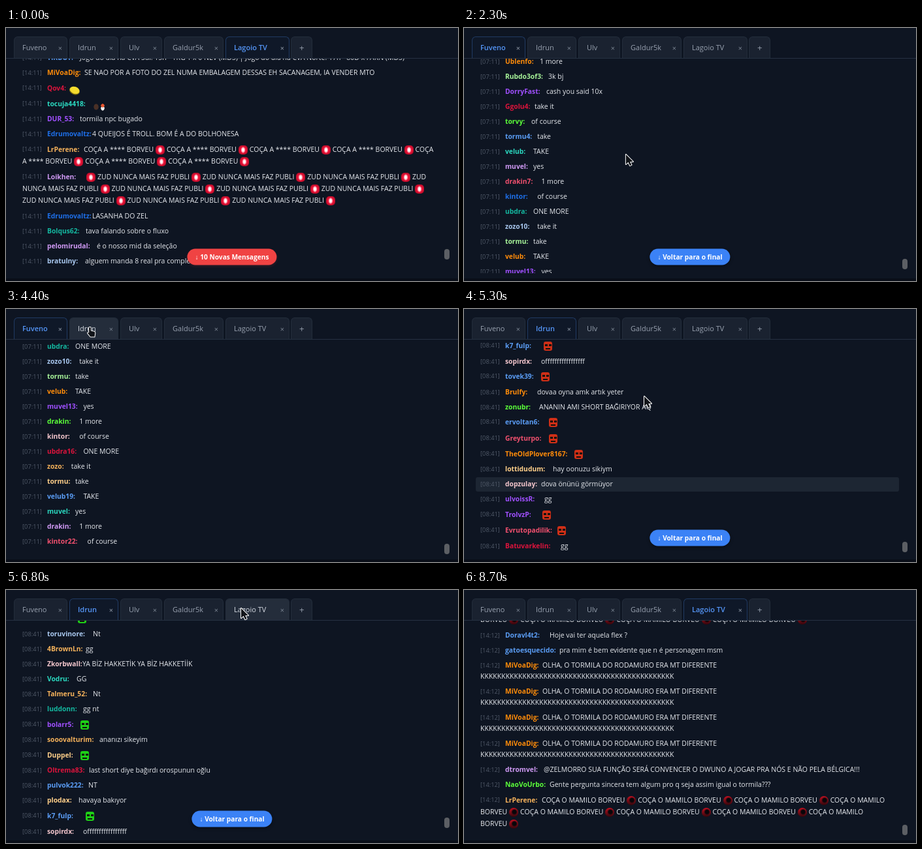
These frames come from a looping animation (692 by 388 pixels, 8800 ms). An HTML page:

```html
<!DOCTYPE html>
<html lang="pt-BR">
<head>
<meta charset="utf-8">
<title>Chat em abas</title>
<style>
html, body { margin: 0; width: 100%; height: 100%; overflow: hidden; background: #0e1522; }
body { font: 10.5px "Open Sans", "Noto Sans", sans-serif; color: #e6e9ee; }
#stage { position: relative; width: 692px; height: 388px; overflow: hidden; }
#stage::before { content: ""; position: absolute; left: 0; right: 0; top: 384px; height: 4px; background: #090e18; }
#stage > *, .row, .row > i, .row > b { position: absolute; }
.tab { top: 13px; height: 33px; box-sizing: border-box; padding-left: 12px; border: 1px solid #232d3b; border-bottom: 0;
  border-radius: 6px 6px 0 0; background: #1a2230; color: #98a1af; font-size: 11px; font-weight: 500; line-height: 32px; white-space: pre; }
.tab span { position: absolute; right: 7px; top: 1px; color: #7b8492; }
.tab.hover { background: #242d3b; color: #d5dae2; }
.tab.active { background: #0f1828; border-color: #203a62; color: #5596f8; font-weight: 600; }
#line { top: 46px; left: 0; width: 692px; height: 1px; background: #263142; }
#chat { top: 47px; left: 0; width: 692px; height: 329px; overflow: hidden; }
.list { position: absolute; top: -47px; left: 0; width: 100%; }
.row { left: 18px; width: 641px; padding-left: 7px; border-radius: 3px; line-height: 17px; white-space: pre; }
.row.emoted { line-height: 18px; }
.row.hover { background: #1d2633; box-shadow: 0 -2px #1d2633, 0 3px #1d2633; }
.row i { left: 7px; text-indent: 0; font-style: normal; font-size: 9.3px; color: #505968; }
.row b { left: 45px; text-indent: 0; font-size: 10.3px; }
.e { display: inline-block; width: 14px; height: 14px; margin: 0 .2px; vertical-align: middle; border-radius: 4px; text-indent: 0; }
.siren { border-radius: 5px; filter: brightness(var(--glow));
  background: radial-gradient(3.5px 5px at 50% 50%, #fff 30%, #ffa5b5 70%, #0000), radial-gradient(#f0183c 40%, #8c0018); }
.dark { border-radius: 7px; background: radial-gradient(5px 5px at 58% 45%, #08060a 55%, #0000), linear-gradient(var(--turn), #c01020, #32060c); }
.face { width: 13px; border-radius: 3px; color: #10120f; background:
  linear-gradient(currentColor 0 0) 2px 4px / 4px 3px no-repeat,
  linear-gradient(currentColor 0 0) 8px 4px / 4px 3px no-repeat,
  linear-gradient(currentColor 0 0) 3px 10px / 7px 2px no-repeat, hsl(var(--hue) 80% 45%); }
.blob { width: 16px; height: 12px; margin-top: 6px; border-radius: 50%; background: #f5dc2e; box-shadow: inset 0 -1px 1px #4a3d00;
  transform: rotate(var(--rock)); }
.duo { width: 19px; margin-top: 7px; border-radius: 0; background:
  radial-gradient(4px 5px at 5px 7px, #4a3026 80%, #0000),
  radial-gradient(3px 3px at 15px 5px, #e8552f 80%, #0000),
  radial-gradient(3px 4px at 15px 9px, #eee 80%, #0000); }
#thumb { left: 671px; width: 8px; height: 16px; border-radius: 4px; background: #5c5f64; }
#button { left: 346px; top: 351px; height: 25px; padding: 0 12px; border-radius: 13px; color: #fff;
  font: 700 10.2px/25px "Open Sans", "Noto Sans", sans-serif; white-space: pre; }
#cursor { left: 0; top: 0; overflow: visible; width: 1px; height: 1px; }
</style>
</head>
<body>
<div id="stage">
  <div id="chat"></div>
  <div id="line"></div>
  <div id="thumb"></div>
  <div id="button"></div>
  <svg id="cursor" fill="#12151a" stroke="#fff" stroke-width="2" paint-order="stroke" stroke-linejoin="round">
    <path id="arrow" d="M0 0V15L3.6 11.8 6.2 17.2 8.6 16 6.2 11H11Z"/>
    <path id="hand" d="M4.5 1A1.4 1.4 0 0 1 5.9 2.4V6.6L11 7.8Q12.5 8.2 12.3 9.8L11.5 15.5H5.3L1.2 10.3Q.9 8.8 2.3 8.9L3.1 9.5V2.4A1.4 1.4 0 0 1 4.5 1Z"/>
  </svg>
</div>
<script>
const LOOP = 8800, ROW = 23;
const $ = id => document.getElementById(id);

const COLORS = { b: '#5b9df5', B: '#1e6fe8', o: '#ff8c0a', c: '#dc143c', t: '#2bd9c0', g: '#14b8a0', v: '#a050ff', y: '#f5b25b',
  l: '#d09af5', s: '#a9c8ef', G: '#5cff3a', n: '#ffd08a', p: '#f0506e', h: '#a8f59a', w: '#f3c6cc' };
const EMOTES = { '#': 'siren', '%': 'dark', '~': 'face', '^': 'blob', '§': 'duo' };

const coca = 'COÇA A **** BORVEU # ', zud = 'ZUD NUNCA MAIS FAZ PUBLI # ', mamilo = 'COÇA O MAMILO BORVEU % ';
const laugh = 'OLHA, O TORMILA DO RODAMURO ERA MT DIFERENTE/' + 'K'.repeat(46);
const mamiloLines = mamilo.repeat(3) + 'COÇA O MAMILO/BORVEU % ' + mamilo.repeat(3);

// Each line: colour|name|message x|message; "/" breaks a line
const parse = text => text.trim().split('\n').map(line => line.split('|'));

const filler = (count, messages) => {
  const parts = ['tor', 'vel', 'mu', 'dra', 'kin', 'ub', 'zo'], hues = Object.keys(COLORS);
  return Array.from({ length: count }, (_, i) => {
    const name = parts[i % 7] + parts[(i * 3 + 2) % 7] + (i % 3 ? '' : i + 4);
    return [hues[i * 4 % 15], name, 75 + name.length * 6.2, messages[i * 5 % messages.length]];
  });
};

const takeRows = parse(`
G|FuvenoRunsBig|165|take
o|Dovek_EK|124|ONE MORE
l|Selvinudora|140|Take that
n|SlowGrotoFan|151|take it
c|Urapa|105|TAKE
s|plvozu|109|yes
p|Onlytov264|135|ONE MORE
G|TurveyTwo|134|1 more
s|dovaltei|118|take
o|Ublenfo|116|1 more
h|Rubdo3of3|129|3k bj
v|DorryFast|126|cash you said 10x
c|Ggolu4|108|take it
G|torvy|103|of course`).concat(filler(19, ['take', '1 more', 'take it', 'yes', 'ONE MORE', 'TAKE', 'of course']));

const turkishRows = parse(`
t|kudrel5|110|~
s|toruvinore|133|Nt
y|4BrownLn|122|gg
w|Zkorbwall|117|YA BİZ HAKKETİK YA BİZ HAKKETİİK
t|Vodru|108|GG
y|Talmeru_52|133|Nt
g|luddonn|118|gg nt
v|bolarr5|114|~
y|sooovalturim|143|ananızı sikeyim
n|Duppel|114|~
c|Oltrema83|127|last short diye bağırdı orospunun oğlu
b|pulvok222|126|NT
n|plodax|111|havaya bakıyor
b|k7_fulp|122|~
w|sopirdx|118|offfffffffffffffff
b|tovek39|118|~
o|Brulfy|112|dovaa oyna amk artık yeter
G|zonubr|115|ANANIN AMI SHORT BAĞIRIYOR AQ
b|ervoltan6|130|~
p|Greyturpo|130|~
o|TheOldPlover8167|169|~
n|lottidudum|136|hay oonuzu sikiym
w|dopzulay|118|dova önünü görmüyor
v|ulvoissR|123|gg
v|TrolvzP|120|~
p|Evrutopadilik|143|~
c|Batuvarkelin|148|gg`).concat(filler(5, ['gg', 'nt', '~', 'GG', 'Nt']));

const brazilRows = parse(`
b|TIKBOT|113|Jogo do dia na CVA Sul: 15h - TRG 1 x 0 NEV (MD3) | Jogo do dia na CVA Norte: 17h - 80D x FARN (MD3)
o|MiVoaDig|120|SE NAO POR A FOTO DO ZEL NUMA EMBALAGEM DESSAS EH SACANAGEM, IA VENDER MTO
c|Qov4|97|^
t|tocuja4418|133|§
v|DUR_53|113|tormila npc bugado
B|Edrumovaltz|132|4 QUEIJOS É TROLL. BOM É A DO BOLHONESA
y|LrPerene|119|${coca.repeat(4)}COÇA/A **** BORVEU # ${coca.repeat(2)}
l|Loikhen|123|# ${zud.repeat(3)}ZUD/NUNCA MAIS FAZ PUBLI # ${zud.repeat(3)}/${zud.repeat(3)}
B|Edrumovaltz|132|LASANHA DO ZEL
g|Bolqus62|122|tava falando sobre o fluxo
l|pelomirudal|139|é o nosso mid da seleção
s|bratulny|121|alguem manda 8 real pra completar
y|LrPerene|119|${mamiloLines}
b|Doravl4t2|131|Hoje vai ter aquela flex ?
b|gatoesquecido|146|pra mim é bem evidente que n é personagem msm
o|MiVoaDig|120|${laugh}
o|MiVoaDig|120|${laugh}
o|MiVoaDig|120|${laugh}
o|MiVoaDig|120|${laugh}
l|dtromvel|122|@ZELMORRO SUA FUNÇÃO SERÁ CONVENCER O DWUNO A JOGAR PRA NÓS E NÃO PELA BÉLGICA!!!
G|NaoVoUrbo|131|Gente pergunta sincera tem algum pro q seja assim igual o tormila???
y|LrPerene|119|${mamiloLines}COÇA O MAMILO/BORVEU %`);

function buildList(rows, firstY, timeOf) {
  const list = document.createElement('div');
  list.className = 'list';
  let y = firstY;
  const items = rows.map(([color, name, x, ...rest], i) => {
    const message = rest.join('|'), emoted = /[#%~^§]/.test(message);
    const lines = message.split('/');
    const row = document.createElement('div');
    row.className = emoted ? 'row emoted' : 'row';
    row.style.top = y - (emoted ? 8.5 : 8) + 'px';
    // Only the first line of a message is indented past the name
    row.innerHTML = `<i>[${timeOf(i)}]</i><b style="color:${COLORS[color]}">${name}:</b>` + lines.map((line, n) =>
      `<div style="text-indent:${n ? 0 : x - 25}px">${line.replace(/[#%~^§]/g, c => `<span class="e ${EMOTES[c]}"></span>`)}</div>`).join('');
    list.append(row);
    const item = { row, y };
    y += ROW + (lines.length - 1) * (emoted ? 18 : 17) + (emoted ? 1.2 : 0);
    item.end = y;
    return item;
  });
  $('chat').append(list);
  return { list, items };
}

const OLD_COUNT = 12;
const takeChat = buildList(takeRows, 57, () => '07:11');
const turkishChat = buildList(turkishRows, 42.8, () => '08:41');
const brazilChat = buildList(brazilRows, 45, i => i < OLD_COUNT ? '14:11' : '14:12');

// Scroll keys are [time, offset]; thumb is thumb travel per scrolled pixel
Object.assign(takeChat, { max: 437, thumb: .0275, keys: [[2000, 437], [2350, 200], [2700, 0], [3300, 0], [3650, 437]] });
Object.assign(turkishChat, { max: 415, thumb: .0275, keys: [[5000, 415], [5300, 290], [5750, 140], [6250, 0]] });
Object.assign(brazilChat, { max: 353, thumb: .06, keys: [[7660, 0], [8150, 353]] });
const chats = [takeChat, turkishChat, null, null, brazilChat];

const tabs = [['Fuveno', 12, 82], ['Idrun', 97, 75], ['Ulv', 175, 64], ['Galdur5k', 242, 91], ['Lagoio TV', 336, 98], ['+', 436, 33]]
  .map(([label, x, width], i) => {
    const el = document.createElement('div');
    el.style.cssText = `left:${x}px;width:${width}px`;
    el.innerHTML = i < 5 ? label + '<span>×</span>' : '<big>+</big>';
    $('stage').insertBefore(el, $('thumb'));
    return { el, x, width };
  });

const pointerKeys = [[150, 400, 300], [900, 60, 29], [1300, 70, 27], [1600, 70, 27], [2000, 240, 190], [2700, 260, 200], [3150, 361, 349],
  [3500, 361, 349], [4200, 130, 10], [4400, 124, 27], [4550, 124, 27], [4950, 276, 134], [6350, 276, 134], [6800, 360, 28],
  [7000, 360, 28], [7450, 324, 352], [8200, 324, 352]];
const handTimes = [[900, 1650], [3080, 3550], [4350, 4620], [6850, 7080], [7380, 8200]];

function track(keys, t) {
  if (t <= keys[0][0]) return keys[0].slice(1);
  const i = keys.findIndex(k => k[0] > t);
  if (i < 0) return keys[keys.length - 1].slice(1);
  const [a, b] = [keys[i - 1], keys[i]], u = (t - a[0]) / (b[0] - a[0]), e = u * u * (3 - 2 * u);
  return a.slice(1).map((v, n) => v + (b[n + 1] - v) * e);
}

function drawButton(t, active, away) {
  const red = active === 4, pulse = (1 - Math.cos(t * Math.PI / 1000)) / 2;
  const visible = red ? t < 7700 : away > 60 && !(active === 0 && t > 3250);
  const button = $('button');
  button.style.display = visible ? '' : 'none';
  button.textContent = red ? `↓ ${t < 1500 ? 10 : 12} Novas Mensagens` : '↓ Voltar para o final';
  button.style.background = red ? '#f04343' : '#3b82f6';
  button.style.boxShadow = red ? `0 2px ${4 + 6 * pulse}px rgba(240,67,67,${.15 + .35 * pulse})` : '0 2px 5px #0006';
  button.style.transform = `translate(-50%,-50%) scale(${red ? 1 + .04 * pulse : 1})`;
}

function draw(t) {
  const active = t < 1500 ? 4 : t < 4430 ? 0 : t < 6950 ? 1 : 4;
  const chat = chats[active], [scroll] = track(chat.keys, t);
  const [px, py] = track(pointerKeys, t);
  const shown = t > 150 && t < 8250, hand = handTimes.some(([a, b]) => t >= a && t < b);

  tabs.forEach(({ el, x, width }, i) => {
    const hover = shown && py > 13 && py < 46 && px >= x && px < x + width;
    el.className = 'tab' + (i === active ? ' active' : hover ? ' hover' : '');
  });

  for (const c of [takeChat, turkishChat, brazilChat]) c.list.style.display = c === chat ? '' : 'none';
  chat.list.style.transform = `translateY(${-scroll}px)`;
  // New messages are held back until the button is pressed
  for (const { row } of brazilChat.items.slice(OLD_COUNT)) row.style.display = t < 7660 ? 'none' : '';
  // Row highlighting lags behind wheel scrolling
  const hoverY = py + track(chat.keys, t - 300)[0];
  for (const { row, y, end } of chat.items)
    row.classList.toggle('hover', shown && !hand && py > 47 && hoverY >= y - 11.5 && hoverY < end - 11.5);

  const away = chat.max - scroll;
  $('thumb').style.top = 360 - away * chat.thumb + 'px';
  drawButton(t, active, away);

  const css = $('chat').style;
  css.setProperty('--hue', (t - 5300) / 1150 * 360 + 8);
  css.setProperty('--glow', 1 + .12 * Math.sin(t / 80));
  css.setProperty('--turn', t * .6 + 'deg');
  css.setProperty('--rock', 20 * Math.cos(t / 110) + 'deg');

  $('cursor').style.display = shown ? '' : 'none';
  $('cursor').style.transform = `translate(${px}px,${py}px)`;
  $('arrow').style.display = hand ? 'none' : '';
  $('hand').style.display = hand ? '' : 'none';
}

const start = performance.now();
function frame() {
  const t = (performance.now() - start) % LOOP;
  draw(Math.floor(t / 100) * 100);
  requestAnimationFrame(frame);
}
frame();
</script>
</body>
</html>
```
